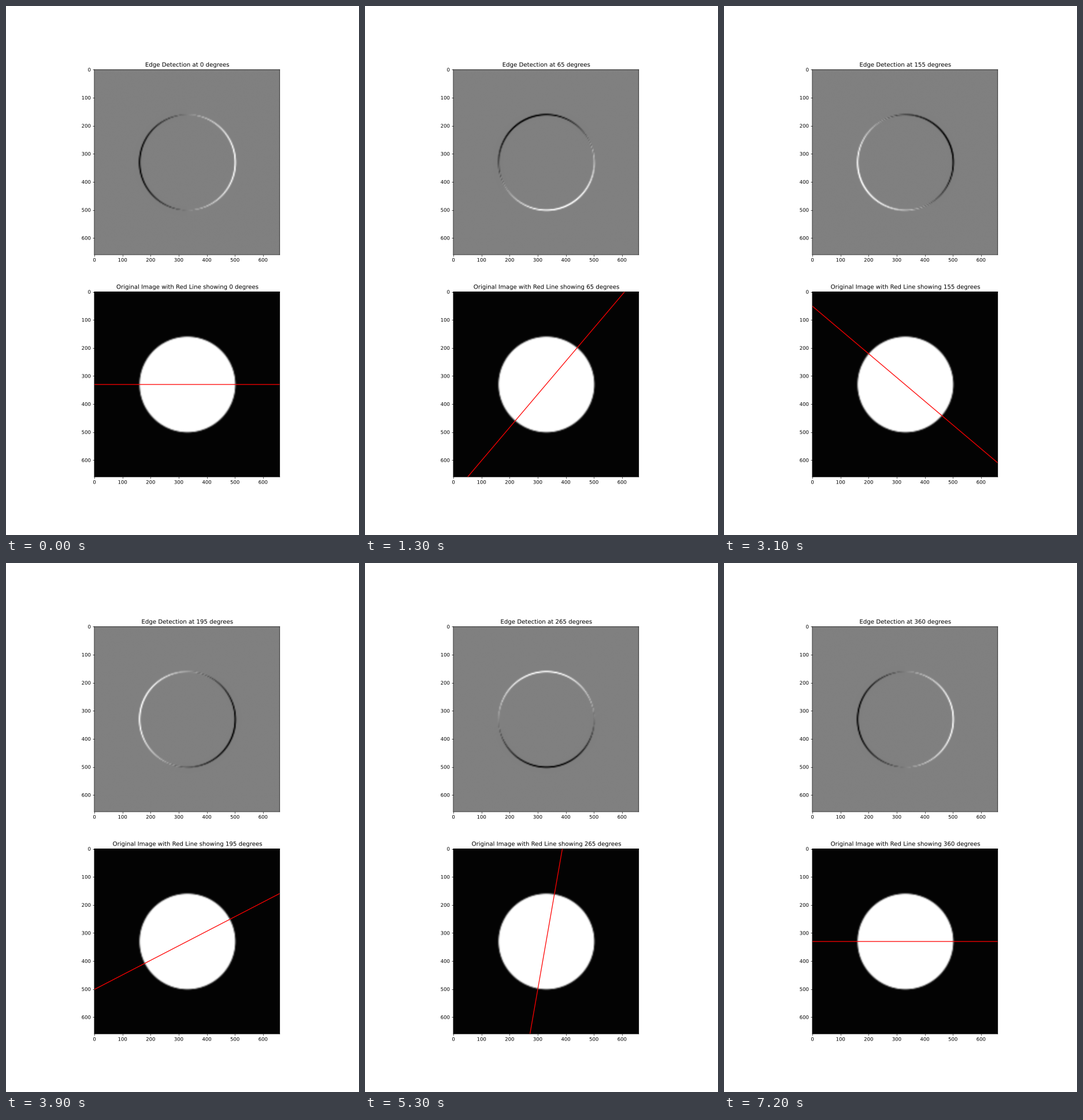
Recreate the animation shown at these times as a matplotlib script. Size 611x917 px, loop 7.3 s.

```python
import numpy as np
import matplotlib.pyplot as plt
from matplotlib.animation import FuncAnimation
from matplotlib.patheffects import Normal

plt.rcParams["font.family"] = "DejaVu Sans"
plt.rcParams["text.hinting"] = "no_hinting"

SIZE = 660          # image side
BLOCK = 4           # coarse cell side
CENTER, RADIUS = 331.2, 170.3
STEP = 5            # degrees per frame
FRAMES = 360 // STEP + 1
DPI = 61.1


def make_disc():
    """White disc drawn on a coarse grid and smoothly enlarged."""
    cells = (np.arange(SIZE // BLOCK) + 0.5) * BLOCK
    dist = np.hypot(cells[:, None] - CENTER, cells[None, :] - CENTER)
    coarse = np.clip((RADIUS - dist) / 3 + 0.5, 0, 1)
    pixels = np.arange(SIZE) + 0.5
    weights = np.exp(-0.5 * ((pixels[:, None] - cells[None, :]) / 2.4) ** 2)
    weights /= weights.sum(axis=1, keepdims=True)
    return (weights @ coarse @ weights.T).astype(np.float32)


disc = make_disc()
grad_y, grad_x = np.gradient(disc)


def edges(angle):
    t = np.radians(angle)
    response = -(np.cos(t) * grad_x + np.sin(t) * grad_y)
    return response / np.abs(response).max()


def line_ends(angle):
    t = np.radians(angle)
    reach = SIZE * np.array([-1, 1])
    x = SIZE / 2 + reach * np.cos(t)
    y = SIZE / 2 - reach * np.sin(t)
    return np.clip(x, 0, SIZE - 1), np.clip(y, 0, SIZE - 1)


fig, (top, bottom) = plt.subplots(
    2, 1, figsize=(611.01 / DPI, 917.01 / DPI), dpi=DPI)
fig.subplots_adjust(left=0.1253, right=0.9003, bottom=0.1098, top=0.8798)
edge_image = top.imshow(edges(0), cmap="gray", vmin=-1, vmax=1)
bottom.imshow(disc, cmap="gray", vmin=-0.012, vmax=1)
line, = bottom.plot([], [], color="red", lw=1.5, snap=False)
top_title = top.set_title("")
bottom_title = bottom.set_title("")

for ax in (top, bottom):
    ax.set_xlim(-0.5, SIZE - 0.5)
    ax.set_ylim(SIZE - 0.5, -0.5)
    for spine in ax.spines.values():
        spine.set_snap(False)
    # Outline text keeps its fractional pixel position.
    for label in [ax.title, *ax.get_xticklabels(), *ax.get_yticklabels()]:
        label.set_path_effects([Normal()])


def update(frame):
    angle = frame * STEP
    edge_image.set_data(edges(angle))
    line.set_data(*line_ends(angle))
    top_title.set_text(f"Edge Detection at {angle} degrees")
    bottom_title.set_text(
        f"Original Image with Red Line showing {angle} degrees")
    return edge_image, line, top_title, bottom_title


anim = FuncAnimation(fig, update, frames=FRAMES, interval=100, repeat=True,
                     repeat_delay=0, blit=False)
plt.show()
```
